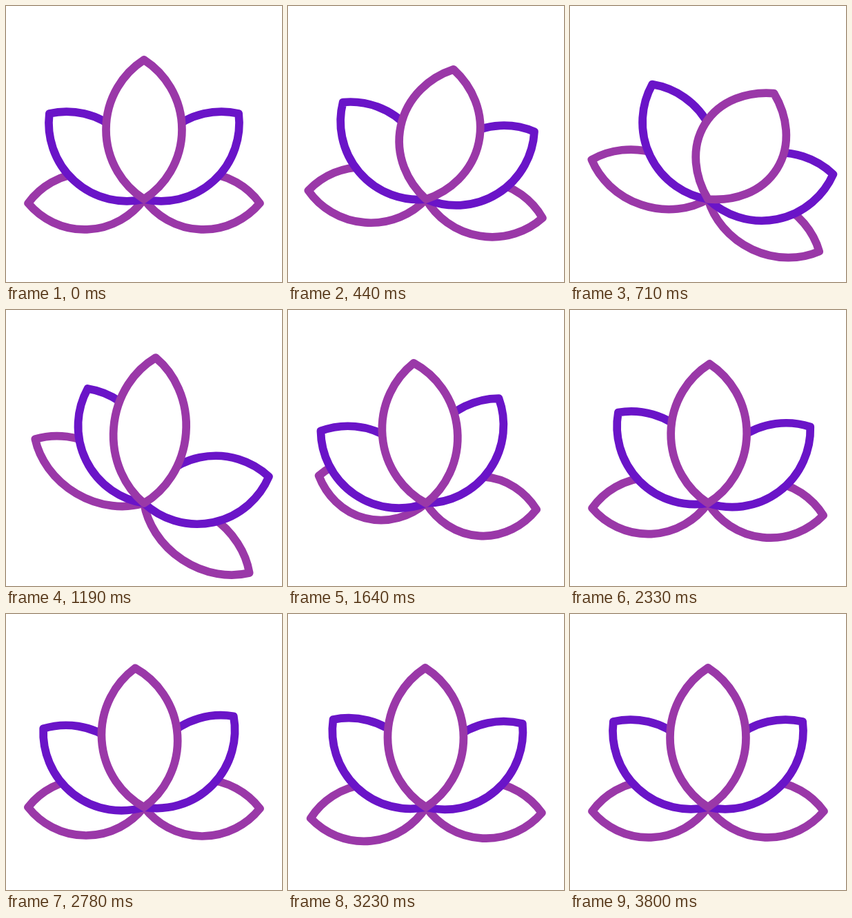
An HTML page for the animation above (3.83 s loop, 400 by 400 pixels).

```html
<!DOCTYPE html>
<html lang="en">
<head>
<meta charset="utf-8">
<title>Swaying lotus</title>
<style>
  html, body { margin: 0; height: 100%; overflow: hidden; background: #fff; }
  svg { display: block; width: 100%; height: 100%; }
  path { fill: #fff; stroke-width: 11.7; stroke-linejoin: round; vector-effect: non-scaling-stroke; }
</style>
</head>
<body>
<svg viewBox="0 0 400 400"></svg>
<script>
const LOOP = 3830, STEP = 30;
const PINK = '#9a38a8', VIOLET = '#6a14c8';
const svg = document.querySelector('svg');

// Tracks are [time, value] pairs, eased in and out between neighbours.
const lowStretch = [[200, 1], [1050, 1.092], [1150, 1.092], [1700, .95], [2250, 1]];
const still = [[0, 1]];

// Back to front; every petal swings about the base of the flower.
const petals = [
  { color: PINK, length: 168, bulge: 41, rest: -92, stretch: lowStretch,
    swing: [[200, 0], [1060, 32.5], [1300, 32.5], [2100, -9], [2500, 5], [3200, -3.5], [3800, 0]] },
  { color: PINK, length: 168, bulge: 41, rest: 92, stretch: lowStretch,
    swing: [[200, 0], [1000, 33], [1100, 33], [1880, -8], [2420, 5], [2900, -2.5], [3350, 1.5], [3800, 0]] },
  { color: VIOLET, length: 185, bulge: 48, rest: -47.85, stretch: still,
    swing: [[200, 0], [905, 27], [1020, 27], [1720, -9], [2230, 3.8], [2800, -4.2], [3300, 1.5], [3800, 0]] },
  { color: VIOLET, length: 185, bulge: 48, rest: 47.85, stretch: still,
    swing: [[200, 0], [905, 38], [1020, 38], [1720, -15], [2230, 6.2], [2800, -3.3], [3300, 1.5], [3800, 0]] },
  { color: PINK, length: 202, bulge: 55, rest: 0,
    stretch: [[200, 1], [710, .895], [1230, 1.05], [1800, 1]],
    swing: [[200, 0], [800, 34], [1420, -8.7], [2050, 4.5], [2650, -4], [3350, 0]] },
];

for (const petal of petals) {
  const { length, bulge, color } = petal;
  const r = (length * length / 4 + bulge * bulge) / (2 * bulge);
  petal.path = document.createElementNS(svg.namespaceURI, 'path');
  petal.path.setAttribute('d', `M0 0A${r} ${r} 0 0 1 0 ${-length}A${r} ${r} 0 0 1 0 0Z`);
  petal.path.setAttribute('stroke', color);
  svg.append(petal.path);
}

function valueAt(track, t) {
  const next = track.findIndex(([time]) => time > t);
  if (next < 0) return track[track.length - 1][1];
  if (next === 0) return track[0][1];
  const [t0, a] = track[next - 1], [t1, b] = track[next];
  const u = (t - t0) / (t1 - t0);
  return a + (b - a) * u * u * (3 - 2 * u);
}

function draw(now) {
  const t = Math.floor((now % LOOP - 20) / STEP) * STEP + 20;
  for (const { path, rest, swing, stretch } of petals) {
    const s = valueAt(stretch, t);
    path.setAttribute('transform',
      `translate(200 280) rotate(${rest + valueAt(swing, t)}) scale(${1 / s} ${s})`);
  }
}

const start = performance.now();
function tick() {
  draw(performance.now() - start);
  requestAnimationFrame(tick);
}
tick();
</script>
</body>
</html>
```
